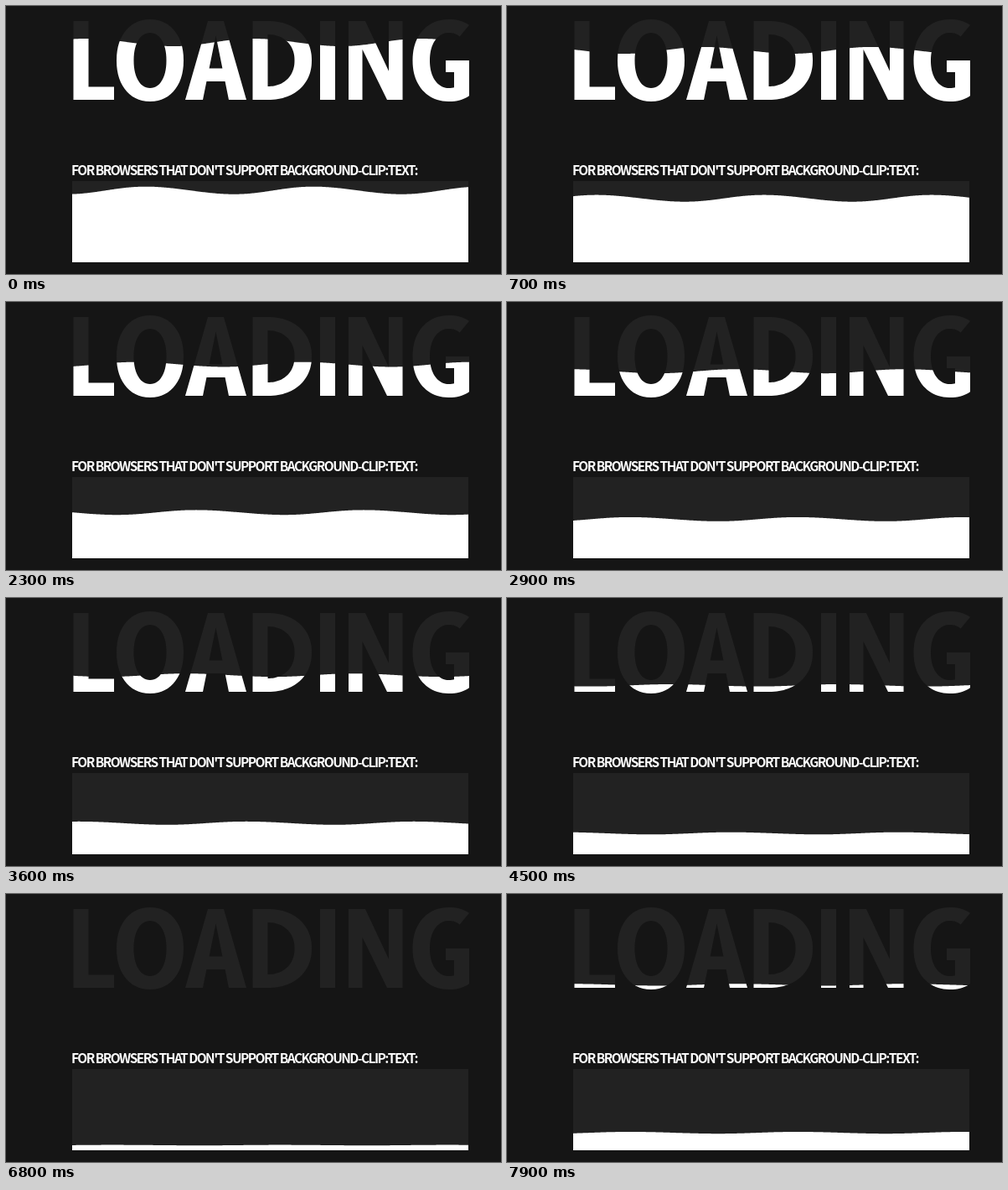
Animation of 591x320 px, one loop 8000 ms. Source, as an HTML page with a canvas:

```html
<!DOCTYPE html>
<html lang="en">
<head>
<meta charset="utf-8">
<title>Loading</title>
<style>
  html, body { margin: 0; width: 100%; height: 100%; overflow: hidden; background: #151515; }
  canvas, svg { position: absolute; left: 0; top: 0; }
  text { font: 700 15.5px "Noto Sans CJK JP", "Noto Sans CJK SC", "Open Sans", sans-serif; fill: #fff; }
</style>
</head>
<body>
<canvas id="stage" width="591" height="320" role="img" aria-label="LOADING"></canvas>
<svg width="591" height="320">
  <text id="note" x="78" y="202">FOR BROWSERS THAT DON'T SUPPORT BACKGROUND-CLIP:TEXT:</text>
</svg>
<script>
const ctx = document.getElementById('stage').getContext('2d');
const note = document.getElementById('note');

const LOOP = 8000, STEP = 100;
const EMPTY_AT = 6.35;      // seconds until the water has drained
const RATE = 14.3;          // level change, px per second
const WAVE = 200;           // wave length, and px travelled per second
const BOX = { x: 79, y: 209, w: 473, h: 97 };
const TOP = 18, BASE = 112, MID = 65, STEM = 18;

const word = new Path2D();

const bar = (x, y, w, h) => word.rect(x, y, w, h);
const stem = x => bar(x, TOP, STEM, BASE - TOP);

// Full-height slanted stroke
function slant(xTop, xBase, wTop, wBase) {
  word.moveTo(xTop, TOP);
  word.lineTo(xTop + wTop, TOP);
  word.lineTo(xBase + wBase, BASE);
  word.lineTo(xBase, BASE);
  word.closePath();
}

// Slightly squarish bowl between two angles, thinner at top and bottom
function bowl(cx, rx, ry, from, to) {
  const n = 60, bend = v => Math.sign(v) * Math.abs(v) ** 0.92;
  const point = (a, inX, inY) =>
    word.lineTo(cx + (rx - inX) * bend(Math.cos(a)), MID + (ry - inY) * bend(Math.sin(a)));
  word.moveTo(cx + rx * bend(Math.cos(from)), MID + ry * bend(Math.sin(from)));
  for (let i = 1; i <= n; i++) point(from + (to - from) * i / n, 0, 0);
  for (let i = n; i >= 0; i--) point(from + (to - from) * i / n, 20.5, 16);
  word.closePath();
}

// L
stem(80.5);
bar(80.5, 96.5, 48.5, 15.5);
// O
bowl(172, 40, 49, 0, 2 * Math.PI);
// A
slant(241, 214, 13, 21);
slant(247, 266, 13, 21);
bar(228, 74.5, 45, 15.5);
// D
stem(294.5);
bowl(312.5, 52.5, 47, -Math.PI / 2, Math.PI / 2);
// I
stem(375);
// N
bar(409, TOP, 16.5, BASE - TOP);
slant(409, 455, 20, 18);
bar(457, TOP, 16.5, BASE - TOP);
// G
bowl(529, 43.5, 49, 1.02, 2 * Math.PI - 1.02);
bar(525, MID, 28, 14);
bar(535, MID, STEM, 42);

// White water resting on `bottom`, with a crest at x = crest
function water(bottom, level, crest) {
  const left = BOX.x - 1, right = BOX.x + BOX.w + 2;
  ctx.beginPath();
  ctx.moveTo(left, bottom);
  for (let x = left; x <= right; x++) {
    const a = (x - crest) / WAVE * 2 * Math.PI;
    const lift = Math.cos(a - 0.08 * (1 - Math.cos(a)));
    ctx.lineTo(x, bottom - level * (0.945 + 0.05 * lift));
  }
  ctx.lineTo(right, bottom);
  ctx.fillStyle = '#fff';
  ctx.fill();
}

// Dark shape, filled with water
function vessel(shape, bottom, level, crest) {
  ctx.fillStyle = '#222';
  ctx.fill(shape);
  ctx.save();
  ctx.clip(shape);
  water(bottom, level, crest);
  ctx.restore();
}

const box = new Path2D();
box.rect(BOX.x, BOX.y, BOX.w, BOX.h);

function draw(ms) {
  const t = Math.floor(ms % LOOP / STEP) * STEP / 1000;
  const level = Math.abs(t - EMPTY_AT) * RATE;
  const crest = 167 + t * WAVE;

  ctx.fillStyle = '#151515';
  ctx.fillRect(0, 0, 591, 320);
  vessel(word, 129.3, level, crest - 72);
  vessel(box, BOX.y + BOX.h, level, crest);
}

// Tight tracking, whichever face is available
const spare = 413 - note.getComputedTextLength();
note.style.letterSpacing = spare / note.textContent.length + 'px';

const start = performance.now();
function tick() {
  draw(performance.now() - start);
  requestAnimationFrame(tick);
}
tick();
</script>
</body>
</html>
```
